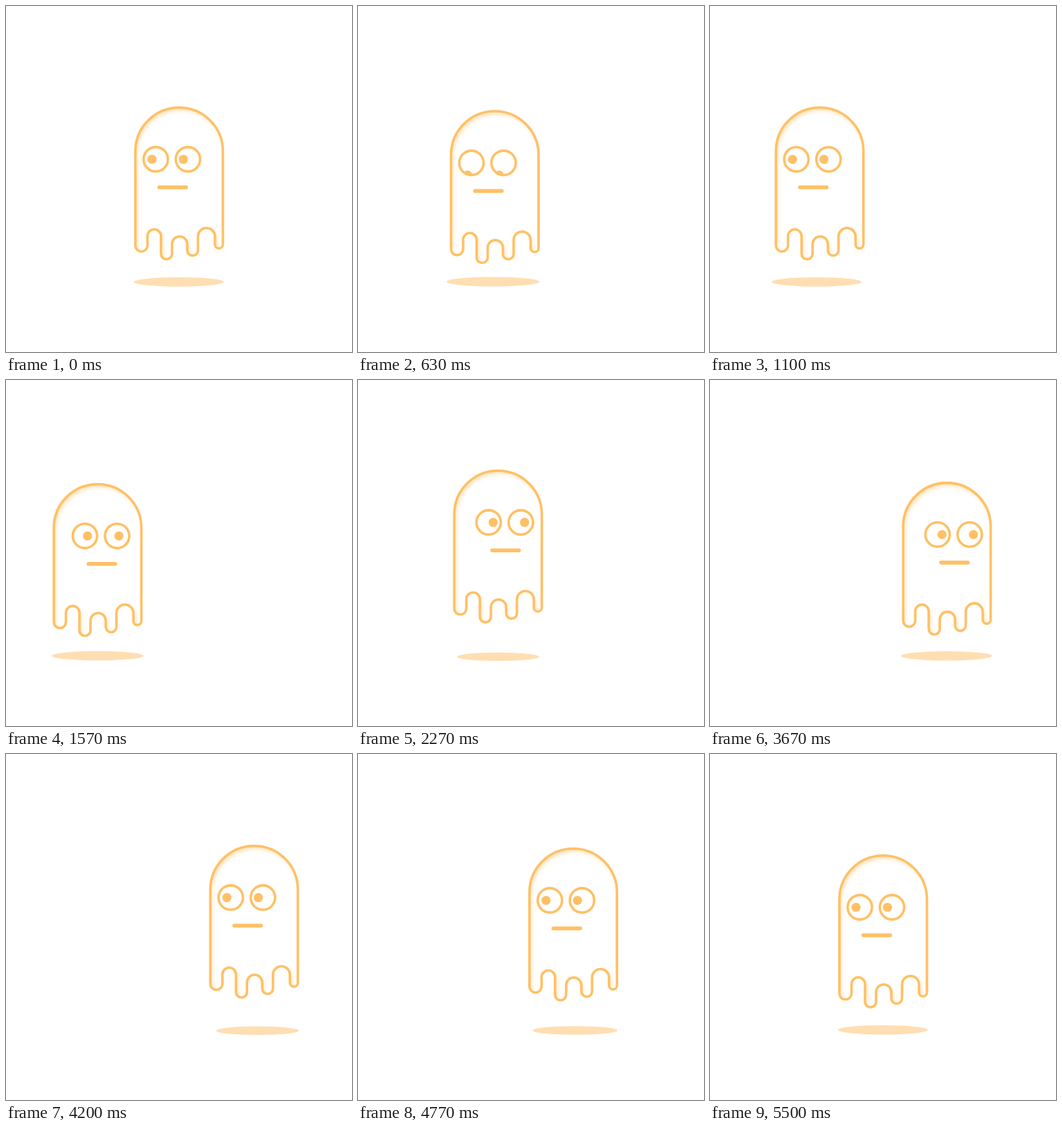
Write an HTML page that moves like this. It is 500 px wide and 500 px high and loops after 5.53 s.

```html
<!DOCTYPE html>
<html>
<head>
<meta charset="utf-8">
<title>Floating ghost</title>
<style>
html, body { margin: 0; width: 100%; height: 100%; overflow: hidden; background: #fff; }
svg { display: block; width: 100vw; height: 100vh; }
.line { fill: none; stroke: #ffc065; stroke-width: 3.6; stroke-linecap: round; stroke-linejoin: round; }
.dot { fill: #ffc065; }
</style>
</head>
<body>
<svg viewBox="0 0 500 500">
  <defs>
    <path id="body" d="M187 210V346A8.75 8.75 0 0 0 204.5 346V332.5A9.75 9.75 0 0 1 224 332.5V358A8 8 0 0 0 240 358V344A11 11 0 0 1 262 344V353A7.75 7.75 0 0 0 277.5 353V333A12.25 12.25 0 0 1 302 333V344.5A5.75 5.75 0 0 0 313.5 344.5V210A63.25 63.25 0 0 0 187 210Z"/>
    <clipPath id="inside"><use href="#body"/></clipPath>
    <clipPath id="sockets"><circle cx="216.5" cy="221.5" r="18"/><circle cx="263" cy="221.5" r="18"/></clipPath>
    <filter id="blur" filterUnits="userSpaceOnUse" x="120" y="80" width="260" height="340"><feGaussianBlur stdDeviation="3"/></filter>
  </defs>
  <ellipse id="shadow" fill="#ffdeb2"/>
  <g id="ghost">
    <use href="#body" fill="#fff"/>
    <g clip-path="url(#inside)">
      <path id="glow" fill="#ffc065" fill-rule="evenodd" opacity=".5" filter="url(#blur)" transform="translate(2.5 4)"/>
    </g>
    <use href="#body" class="line"/>
    <g id="face">
      <g clip-path="url(#sockets)">
        <g id="pupils" class="dot"><circle cx="211" cy="221.5" r="6.6"/><circle cx="256.4" cy="221.5" r="6.6"/></g>
      </g>
      <circle class="line" cx="216.5" cy="221.5" r="17.6"/>
      <circle class="line" cx="263" cy="221.5" r="17.6"/>
      <path class="line" style="stroke-width:5.6" d="M221.7 262H260.3"/>
    </g>
  </g>
</svg>
<script>
const LOOP = 5530, END = 5500;
const $ = id => document.getElementById(id);
const clamp = v => Math.max(0, Math.min(1, v));
const ease = p => (1 - Math.cos(Math.PI * clamp(p))) / 2;
const move = (id, x, y) => $(id).setAttribute('transform', `translate(${x} ${y})`);

// The glow is everything outside the body, blurred and clipped to the inside
$('glow').setAttribute('d', 'M100 60H400V420H100Z' + $('body').getAttribute('d'));

// Vertical drift: [time, offset]
const drift = [[0, 0], [600, 5.3], [1133, 0], [1520, 4.6], [1700, -1], [2230, -16], [2833, 8],
  [3050, 17.2], [3400, 9.5], [3667, 2], [3967, -9], [4400, -16], [4767, -10], [5070, -16], [END, 0]];
const last = drift.length - 1;
const secant = i => {
  const k = (i + last) % last, [a, b] = [drift[k], drift[k + 1]];
  return (b[1] - a[1]) / (b[0] - a[0]);
};
const tangent = i => {
  const a = secant(i - 1), b = secant(i);
  return a * b > 0 ? 2 * a * b / (a + b) : 0;
};
function driftAt(t) {
  let i = 0;
  while (i < last - 1 && t > drift[i + 1][0]) i++;
  const [t0, y0] = drift[i], [t1, y1] = drift[i + 1], h = t1 - t0, u = (t - t0) / h, v = 1 - u;
  return y0 * (1 + 2 * u) * v * v + tangent(i) * h * u * v * v
    + y1 * u * u * (3 - 2 * u) - tangent(i + 1) * h * u * u * v;
}

// Straight run: centre, left, right, centre
function sway(t, turn, reach) {
  if (t < turn) return -reach * t / turn;
  if (t > END - turn) return reach * (END - t) / turn;
  return reach * (2 * (t - turn) / (END - 2 * turn) - 1);
}

function draw() {
  const t = Math.min(performance.now() % LOOP, END);
  const y = driftAt(t);
  const look = ease((t - 1300) / 400) - ease((t - 3800) / 400);
  const dip = ease((t - 450) / 150) - ease((t - 670) / 150);
  move('ghost', sway(t, 1500, 125), y);
  move('face', 20.2 * look, 0);
  move('pupils', 12 * look, 17.5 * dip);

  const rx = 65 + 0.37 * y, s = $('shadow');
  s.setAttribute('cx', 250 + sway(t, 1467, 128));
  s.setAttribute('cy', 398.8 - 0.07 * y);
  s.setAttribute('rx', rx);
  s.setAttribute('ry', rx * 0.103);
  requestAnimationFrame(draw);
}
draw();
</script>
</body>
</html>
```
